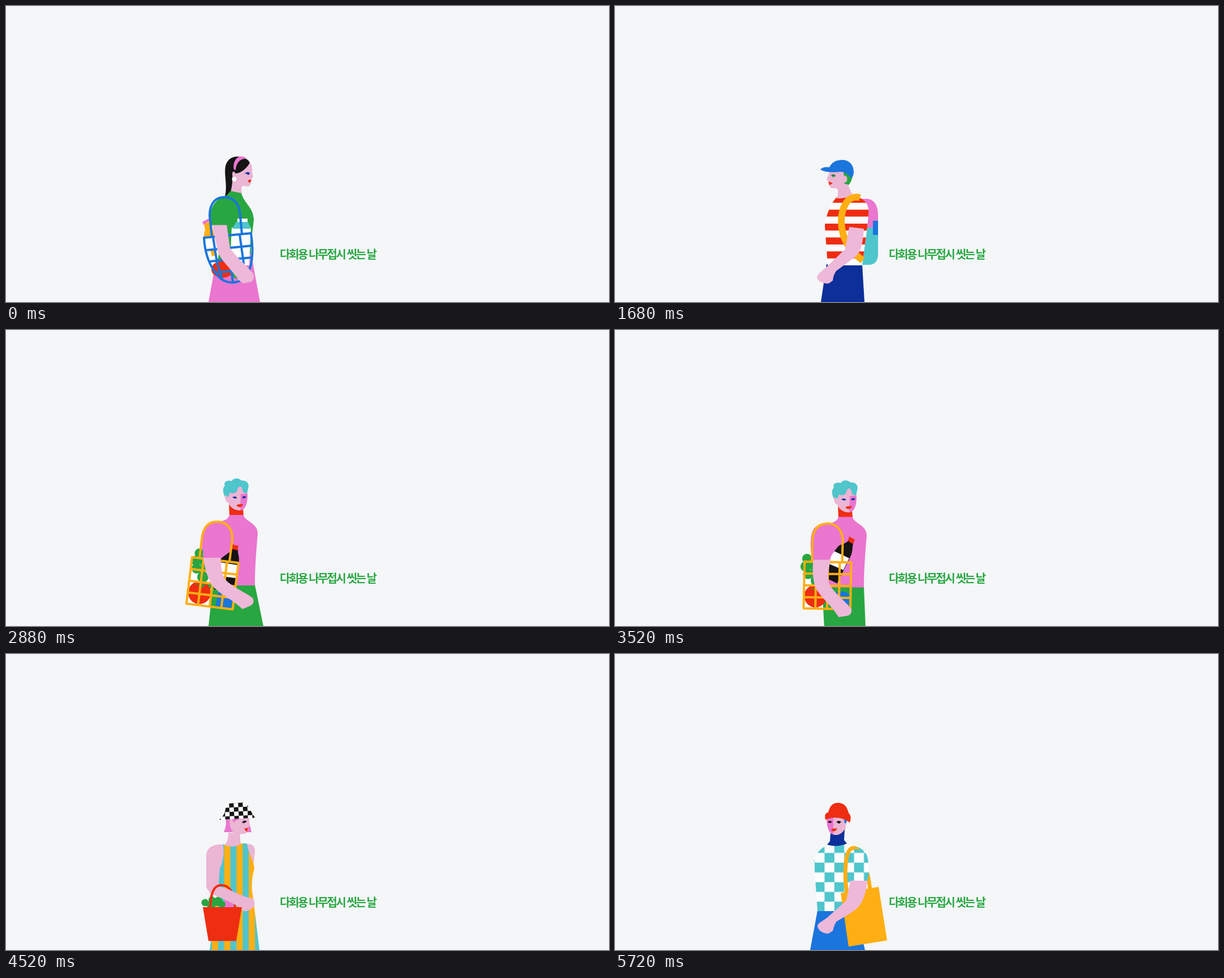
These frames come from a looping animation (1066 by 525 pixels, 5760 ms). An HTML page:

```html
<!DOCTYPE html>
<html lang="ko">
<head>
<meta charset="utf-8">
<title>Walkers with reusable bags</title>
<style>
  html, body { margin: 0; width: 100%; height: 100%; overflow: hidden; background: #f4f6f8; }
  svg { display: block; width: 100vw; height: 100vh; }
  text { font: 700 20px "Noto Sans CJK KR", "Noto Sans CJK", sans-serif; letter-spacing: -.12em; }
  .skin { fill: #eeb8d9; } .face { fill: #ebb5d4; }
  .green { fill: #28a641; } .pink { fill: #ea76cf; } .blue { fill: #1a75dd; }
  .red { fill: #ee2d11; } .orange { fill: #ffae13; } .teal { fill: #4fc5cc; }
  .navy { fill: #0c2f99; } .black { fill: #161415; } .white { fill: #fcfdfe; }
  .line { fill: none; stroke-width: 4; stroke-linejoin: round; }
</style>
</head>
<body>
<svg viewBox="0 0 1066 525" preserveAspectRatio="none">
  <defs>
    <clipPath id="tee"><path id="teeShape" d="M391 340L420 334 436 342C446 347 450 358 448 372L445 400 437 460H376L371 390C373 370 382 350 391 340Z"/></clipPath>
    <pattern id="hatChecks" width="16" height="15.4" x="395" y="264" patternUnits="userSpaceOnUse" patternTransform="rotate(-3 408 278)">
      <path class="white" d="M0 0h16v16H0z"/><path class="black" d="M0 0h8v7.7H0zM8 7.7h8v7.7H8z"/>
    </pattern>
    <pattern id="shirtChecks" width="34.8" height="34.6" x="353" y="335.5" patternUnits="userSpaceOnUse">
      <path class="white" d="M0 0h35v35H0z"/><path class="teal" d="M0 0h17.4v17.3H0zM17.4 17.3h17.4v17.3H17.4z"/>
    </pattern>
    <pattern id="dressStripes" width="21.7" height="50" x="375" y="0" patternUnits="userSpaceOnUse">
      <path class="teal" d="M0 0h11v50H0z"/><path class="orange" d="M10.8 0h11v50h-11z"/>
    </pattern>
  </defs>

  <text class="green" x="484" y="448">다회용 나무접시 씻는 날</text>

  <!-- data-swing: pivot x, pivot y, degrees, lag in degrees
       data-legs: waist left x y, waist right x y, hem left, hem right, stride left, stride right -->
  <g class="walker" data-pose="0">
    <path class="white" data-swing="386 342 -4.300 25" d="M350 411L390 407V485C380 483 373 478 368 470C356 452 351 430 350 411Z"/>
    <path class="black" d="M387 338C392 318 385 300 388 284C391 271 401 266 412 267C424 268 431 275 431 279C424 290 414 297 406 297L402 306C398 316 402 325 396 334Z"/>
    <path class="face" d="M431 278C435 281 436 288 435 294L437 303 434 306C434 314 432 320 427 320L418 319C415 323 417 328 417 334L397 330C400 318 401 308 400 298C400 293 404 292 406 298C416 296 426 288 431 278Z"/>
    <path class="pink" d="M413 267C420 266 424 269 425 271C414 270 407 278 406 291L403 290C400 279 406 269 413 267Z"/>
    <circle class="white" cx="403.500" cy="307" r="4"/>
    <path class="navy" d="M421 298Q426 292 431 296L430 299Q426 300 425 297Z"/>
    <path class="red" d="M427 310L431 308 434 308 431 314Z"/>
    <polygon class="pink" data-legs="372 448 433 437 358 449 -10 8"/>
    <path class="green" d="M397 328L416 332C421 350 437 357 438 378C437 395 433 410 433 440L376 455 378 395 362 388C358 360 368 342 390 336Z"/>
    <g data-swing="386 342 -4.300 25">
      <path class="orange" d="M350 387L361 381 368 405 372 442 364 444 358 420 349 411 352 396Z"/>
      <path class="white" d="M352 412L368 410 371 431 361 433Z"/>
      <path class="pink" d="M347 383L358 377 360 381 349 388Z"/>
      <path class="white" d="M409 377h18v6h-18zM399 393H433L430 460H396Z"/>
      <path class="teal" d="M407 383H428L433 395H400Z"/>
      <ellipse class="red" cx="383" cy="467" rx="20" ry="15"/>
      <path class="green" d="M398 472L408 470 415 486 403 482ZM376 440L384 450 374 454Z"/>
      <path class="line" stroke="#1a75dd" d="M350 411L433 403C438 435 437 470 418 485C400 496 380 490 368 470C356 452 351 430 350 411ZM355 433L435 425M361 453L435 446M369 473L428 467M366 410L373 455 383 487M391 408L401 490M413 405L420 455V484"/>
    </g>
    <path class="skin" data-swing="377 392 -9.500 0" d="M363 380H389L396 429C405 444 425 459 437 475C440 484 436 490 430 490L420 492 411 486C400 468 378 450 374 434Z"/>
    <path class="green" d="M364 365H402L390 388.500H362Z"/>
    <path class="line" stroke="#1a75dd" data-swing="386 342 -4.300 25" d="M364 409L360 372C360 348 372 339 386 339C402 339 413 350 414 372L417 404"/>
  </g>

  <g class="walker" data-pose="720">
    <path class="pink" d="M432 342H445C459 343 465 354 465 372V394H440Z"/>
    <path class="teal" d="M443 393H465V440C465 452 460 459 448 459H434Z"/>
    <path class="blue" d="M456 381h9v25h-9z"/>
    <polygon class="navy" data-legs="374 458 437 458 364 441 -12 8"/>
    <path class="face" d="M380 292L376 303 374 308 379 312C378 320 380 325 391 323L394 326V344L421 338 413 320V300L404 293Z"/>
    <use href="#teeShape" class="white"/>
    <path clip-path="url(#tee)" fill="none" stroke="#ee2d11" stroke-width="110" stroke-dasharray="12.400 12.300" d="M410 336.500V449"/>
    <path class="face" d="M394 335L416 331 420 336Q408 342 392 341Z"/>
    <path class="green" d="M404 294L420 301C419 310 414 317 413 317L405 315C409 308 404 304 404 294Z"/>
    <ellipse class="face" cx="407" cy="307" rx="3.500" ry="6"/>
    <path class="blue" d="M363 290C366 286 372 285 379 286C384 276 392 273 402 273C414 273 422 282 422 294C422 300 419 305 418 306C414 300 408 295 400 294C388 295 372 296 363 290Z"/>
    <path class="green" d="M382 300Q386 297 390 302L385 304Z"/>
    <path class="black" d="M382 300Q387 297 391 302L387 300Z"/>
    <path class="red" d="M377 311L385 314 379 318Z"/>
    <path fill="none" stroke="#ffae13" stroke-width="12" d="M433 340C409 333 400 362 400 383C401 412 415 435 438 451"/>
    <path class="skin" data-swing="427 394 18 0" d="M414 392L440 395C438 425 434 438 422 447L391 470C386 478 386 481 385 487L378 492C370 493 357 489 357 481C359 473 371 467 380 457L407 431Z"/>
  </g>

  <g class="walker" data-pose="0">
    <path class="white" data-swing="373 345 3.900 0" transform-origin="0 0" d="M329 403L385 410 375 493 319 486Z"/>
    <polygon class="green" data-legs="366 452 440 452 358 455 -16 16"/>
    <path class="teal" d="M388 298C383 288 382 281 387 276C383 268 394 266 399 268C402 262 412 262 416 267C426 266 431 273 428 281L426 291 393 301Z"/>
    <path class="red" d="M394 306C400 316 410 320 419 316L420 329H395Z"/>
    <path class="face" d="M388 293L393 296 396 288C400 291 408 290 409 283C411 275 418 275 419 288L427 290C427 304 426 319 413 320C404 320 395 314 393 306C388 306 386 296 388 293Z"/>
    <path class="pink" d="M415 291L427 290C427 304 425 318 414 320Z"/>
    <path class="navy" d="M400 297Q405 293 409 298L405 299ZM417 297Q421 293 425 296L421 299Z"/>
    <path class="red" d="M407 311Q411 308 419 309Q417 315 411 314Z"/>
    <path class="pink" d="M395 328H420C422 340 446 342 445 362C442 395 440 425 440 453H366L350 404C344 385 344 360 352 348C362 338 391 344 395 328Z"/>
    <g data-swing="468 423 -10.700 0">
      <path class="black" d="M400 387L410 389C409 397 414 402 411 417L402 466 368 460 379 409C380 401 398 396 400 387Z"/>
      <path class="white" d="M379 412L410 417 406 440 375 436Z"/>
      <path class="red" d="M400 380L411 383 409 391 399 388Z"/>
    </g>
    <g data-swing="373 345 3.900 0">
      <g class="green" data-swing="352 450 6 0">
        <circle cx="342" cy="396" r="8.500"/><circle cx="336" cy="409" r="9"/><circle cx="350" cy="410" r="9"/>
        <circle cx="337" cy="423" r="9"/><circle cx="348" cy="438" r="10"/><path d="M345 400h8v48h-9zM348 447h18v12h-16z"/>
      </g>
      <circle class="red" cx="342" cy="466" r="20"/>
      <path class="green" d="M330 449L342 453 355 449 347 457Z"/>
      <path class="blue" d="M374 467Q387 457 402 469L398 494 371 490Z"/>
      <path class="line" stroke="#ffae13" transform="rotate(7 329 403)" d="M329 403h82.500v83h-82.500zM349.700 403v83M370.500 403v83M391.200 403v83M329 424h82M329 445h82M329 466h82"/>
    </g>
    <path class="skin" data-swing="364 410 -9.500 0" d="M348 396H379C380 425 382 437 390 445C400 455 425 467 436 475C440 483 436 488 430 490L418 495 410 488C395 475 370 464 362 449C355 435 350 418 348 396Z"/>
    <path class="pink" d="M347 375H400Q386 388 379 404H349Z"/>
    <path class="line" stroke="#ffae13" data-swing="373 345 3.900 0" d="M342 405L346 372C348 350 358 340 373 340C390 340 401 352 400 372L395 411"/>
  </g>

  <g class="walker" data-pose="680">
    <path class="pink" d="M388 290H428L434 316H385C389 306 390 300 388 290Z"/>
    <path class="face" d="M397 291H430L431 304 428 308C429 317 424 320 414 319V334L420 340C408 345 394 342 386 338Q393 334 393 317H402Q395 308 395 296Z"/>
    <path class="pink" d="M400 292H416Q407 294 402 299Z"/>
    <path class="black" d="M417 299Q421 293 426 297L421 300Z"/>
    <path class="red" d="M421 310L428 308 426 316Z"/>
    <path fill="url(#hatChecks)" d="M396 265L418 263C424 264 428 268 430 274L440 290Q434 292 428 291L394 293 377 294C383 289 387 283 388 275C390 268 392 266 396 265Z"/>
    <path class="face" d="M425 337C436 336 441 342 440 352L437 376C431 360 427 350 425 337Z"/>
    <polygon fill="url(#dressStripes)" data-legs="374 425 436 425 360 448 -5 5"/>
    <path fill="url(#dressStripes)" d="M383 337C395 343 408 343 417 336H426C427 350 438 365 439 380C435 395 433 410 436 427H374L378 375C384 362 386 350 383 337Z"/>
    <path class="face" d="M383 338C370 336 354 342 354 358V412C356 424 370 428 380 420L376 405 378 380C385 366 386 350 383 338Z"/>
    <g data-swing="381 412 2.500 25">
      <path class="line" stroke="#ee2d11" d="M361 450C362 422 368 410 381 410C394 410 404 422 405 450"/>
      <path class="pink" d="M386 434H402V450H386Z"/>
      <g class="green">
        <circle cx="352" cy="441" r="6.500"/><circle cx="364" cy="436" r="6"/><circle cx="375" cy="439" r="8"/>
        <circle cx="363" cy="445" r="8"/><circle cx="382" cy="444" r="6"/>
      </g>
    </g>
    <path class="face" data-swing="365 418 -4 0" d="M356 411C370 410 385 414 395 418C410 426 425 432 437 434C441 440 440 448 434 452C428 457 418 458 416 452C405 443 385 435 360 424Z"/>
    <g data-swing="381 412 2.500 25">
      <path class="line" stroke="#ee2d11" d="M361 450C362 422 368 410 381 410"/>
      <path class="red" d="M348 449H417L407 509H358Z"/>
    </g>
  </g>

  <g class="walker" data-pose="920">
    <polygon class="blue" data-legs="358 455 425 455 345 442 -14 8"/>
    <path class="face" d="M374 291C385 287 402 288 410 295L407 312C402 319 394 323 387 321C378 318 374 306 374 291Z"/>
    <path class="pink" d="M374 291L386 289V321C378 318 374 306 374 291Z"/>
    <path class="blue" d="M405 293H410L409 300H406Z"/>
    <path class="black" d="M376 298Q379 294 384 298L380 300ZM391 298Q396 294 400 298L396 301Z"/>
    <path class="red" d="M382 311Q387 308 393 310Q389 316 384 314Z"/>
    <path class="red" d="M372 294C370 285 372 282 377 281C380 269 385 264 394 264C405 264 410 270 413 282C418 286 417 294 415 299C405 290 385 287 372 294Z"/>
    <path fill="url(#shirtChecks)" d="M376 339L410 338C430 340 446 348 447 365L449 403H416L414 456H358L352 370C353 355 362 345 376 339Z"/>
    <path class="navy" d="M381 318C390 324 400 321 406 311L405 330 410 336C400 341 385 342 375 338L380 332Z"/>
    <g data-swing="425 345 -4 20">
      <path class="orange" d="M399 424L466 413 481 508 413 519Z"/>
      <path fill="none" stroke="#ffae13" stroke-width="7" d="M410 425C405 390 406 345 421 344C437 344 447 385 451 418"/>
    </g>
    <path fill="url(#shirtChecks)" d="M424 346C440 346 447 358 448 370L449 390 446 403H416C412 385 413 360 424 346Z"/>
    <path class="skin" data-swing="430 404 14 0" d="M416 402H446C444 425 438 440 430 449C418 460 402 468 391 475C386 484 386 489 385 491L377 496C368 496 358 490 358 482C360 475 370 473 378 465L409 437Z"/>
  </g>
</svg>
<script>
const STRIDE = 960, STEP = 40;
const walkers = [...document.querySelectorAll('.walker')];
const order = [0, 1, 2, 2, 3, 4];
const numbers = text => text.split(' ').map(Number);

const angle = ms => 2 * Math.PI * ms / STRIDE;
const bob = ms => 4 * Math.abs(Math.sin(angle(ms)));
const spread = ms => Math.cos(angle(ms)) ** 2;
const swing = (ms, lag) => Math.cos(angle(ms) - lag * Math.PI / 180);

// Shapes are drawn in the pose of phase `data-pose`; movement is relative to it.
function pose(walker, ms) {
  const rest = +walker.dataset.pose;
  walker.setAttribute('transform', `translate(0 ${bob(ms) - bob(rest)})`);
  for (const part of walker.querySelectorAll('[data-swing]')) {
    const [x, y, degrees, lag] = numbers(part.dataset.swing);
    const turn = degrees * (swing(ms, lag) - swing(rest, lag));
    part.setAttribute('transform', `rotate(${turn} ${x} ${y})`);
  }
  for (const legs of walker.querySelectorAll('[data-legs]')) {
    const [lx, ly, rx, ry, hemL, hemR, strideL, strideR] = numbers(legs.dataset.legs);
    const open = spread(ms) - spread(rest);
    const left = hemL + strideL * open, right = hemR + strideR * open;
    legs.setAttribute('points', `${lx},${ly} ${rx},${ry} ${right},525 ${right},535 ${left},535 ${left},525`);
  }
}

function draw(now) {
  const t = Math.floor(now / STEP) * STEP % (STRIDE * order.length);
  const active = walkers[order[Math.floor(t / STRIDE)]];
  for (const walker of walkers) walker.style.display = walker === active ? '' : 'none';
  pose(active, t % STRIDE);
}

const start = performance.now();
function tick() {
  draw(performance.now() - start);
  requestAnimationFrame(tick);
}
tick();
</script>
</body>
</html>
```
